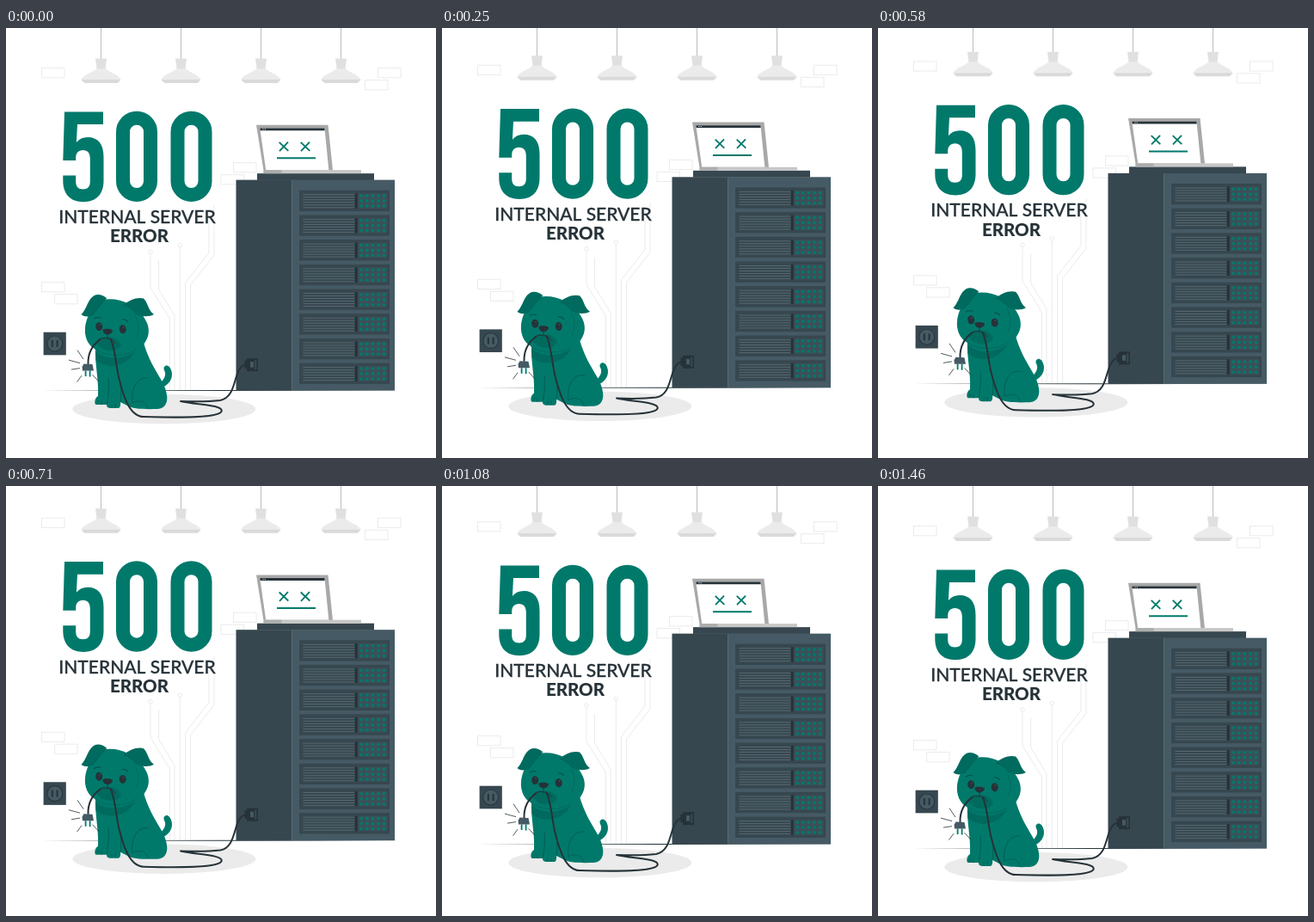
Recreate the animation shown at these times as an HTML page with a canvas. Size 500x500 px, loop 1.5 s.

```html
<!DOCTYPE html>
<html lang="en">
<head>
<meta charset="utf-8">
<title>Internal server error</title>
<style>
  html, body { margin: 0; width: 100%; height: 100%; overflow: hidden; background: #fff; }
  canvas { display: block; width: 500px; height: 500px; }
</style>
</head>
<body>
<canvas id="stage" width="500" height="500"></canvas>
<script>
const ctx = document.getElementById('stage').getContext('2d');
const LOOP = 1500, STEPS = 36, LIFT = 10, REST_Y = 0.4;
const TEAL = '#00796b', SHADE = '#006a5e', LINE = '#00564c';
const INK = '#263238', DARK = '#37474f', SLATE = '#455a64', PALE = '#ebebeb';

function fill(d, color) {
  ctx.fillStyle = color;
  ctx.fill(new Path2D(d));
}

function stroke(d, color, width = 1) {
  ctx.strokeStyle = color;
  ctx.lineWidth = width;
  ctx.lineJoin = 'round';
  ctx.stroke(new Path2D(d));
}

function rect(x, y, w, h, color) {
  ctx.fillStyle = color;
  ctx.fillRect(x, y, w, h);
}

function ellipse(x, y, rx, ry, color, angle = 0) {
  ctx.beginPath();
  ctx.ellipse(x, y, rx, ry, angle, 0, Math.PI * 2);
  ctx.fillStyle = color;
  ctx.fill();
}

function ring(x, y, r) {
  ctx.beginPath();
  ctx.arc(x, y, r, 0, Math.PI * 2);
  ctx.strokeStyle = PALE;
  ctx.lineWidth = 1;
  ctx.stroke();
}

function drawWall() {
  const bricks = [[41.5, 46.5], [432.5, 46.5], [417.5, 60.5], [264.5, 156.5],
                  [250, 170.5], [41.5, 295.5], [56.5, 309.5]];
  ctx.strokeStyle = PALE;
  ctx.lineWidth = 1;
  for (const [x, y] of bricks) ctx.strokeRect(x, y, 26.5, 11.2);

  stroke('M168 262.5V302L190.5 338V421', PALE);
  stroke('M177.5 270V304L196 334V421', PALE);
  stroke('M202.3 255V421', PALE);
  stroke('M236 214V261L208.5 296V421', PALE);
  stroke('M242 206V264L214.5 299V421', PALE);
  ring(168, 260, 2.3);
  ring(202.3, 252.5, 2.3);
}

function drawLamp(x) {
  ctx.save();
  ctx.translate(x, 0);
  stroke('M0 -20V37', '#b5b5b5', 0.9);
  fill('M-5 46H5C6 51 22 54 23 60.5H-23C-22 54 -6 51 -5 46Z', PALE);
  fill('M-6.5 35.5H6.5L5 47H-5Z', '#e0e0e0');
  fill('M-23 60H23L19.5 64H-19.5Z', '#dadada');
  ctx.restore();
}

function drawLabel(text, x, y, font, weight) {
  ctx.font = font;
  ctx.textAlign = 'center';
  ctx.fillStyle = ctx.strokeStyle = INK;
  ctx.lineWidth = weight;
  ctx.fillText(text, x, y);
  ctx.strokeText(text, x, y);
}

function drawTitle() {
  fill(`M68 97.3H113V112H83L81.9 133Q86.5 127 95 127C107 127 113.5 134.5 113.5 150
    V177.5C113.5 193.5 105 202.2 90 202.2C75 202.2 66.3 193.5 66.3 177.5V171.5H81.2V178.5
    C81.2 184.5 84 187.5 89.5 187.5C95 187.5 97.8 184.5 97.8 178.5V152C97.8 145.5 95 142 89.5 142
    C84 142 81.2 145.5 81.2 151V154H66.3Z`, TEAL);
  ctx.strokeStyle = TEAL;
  ctx.lineWidth = 16;
  for (const x of [136, 199.5]) {
    ctx.beginPath();
    ctx.roundRect(x, 104.6, 32, 89.4, 16);
    ctx.stroke();
  }
  drawLabel('INTERNAL SERVER', 152.5, 226.9, '500 21px Lato, sans-serif', 0.35);
  drawLabel('ERROR', 155, 249.2, '800 20.5px Lato, sans-serif', 0.1);
}

function drawUnit(y) {
  rect(341, y, 105, 24.3, DARK);
  for (let i = 0; i < 6; i++) rect(345.5, y + 4.5 + i * 3, 59.5, 1, '#566972');
  rect(406, y + 3.5, 2.6, 17.5, INK);
  rect(409.5, y + 3.5, 34, 17.5, '#3d4f58');
  for (let row = 0; row < 3; row++) {
    for (let col = 0; col < 5; col++) {
      ellipse(413.2 + col * 6.6, y + 6.3 + row * 6, 1.9, 1.9, TEAL);
    }
  }
}

function drawServer() {
  rect(267.5, 176.5, 65, 245, DARK);
  rect(332.5, 176.5, 119.5, 245, SLATE);
  stroke('M332.5 176.5V421.5', '#53666f', 0.8);
  rect(292, 169, 136, 7.8, DARK);
  for (let i = 0; i < 8; i++) drawUnit(188.6 + i * 28.7);
}

function drawLaptop() {
  fill('M291 112.7H374.5L380 165.5H299.5Z', '#a8a8a8');
  fill('M295.3 116.7H370.5L375.3 165H302.2Z', '#fff');
  fill('M295.3 116.4H370.4L370.7 119.2H295.7Z', INK);
  rect(298.5, 117.2, 1, 1, '#fff');
  rect(300.8, 117.2, 1, 1, '#fff');
  rect(299.5, 165, 113.5, 4, '#c7c7c7');
  rect(299.5, 165, 21, 4, '#adadad');
  for (const x of [323, 348]) {
    stroke(`M${x - 5.3} 132.8L${x + 5.3} 142.8M${x + 5} 132.5L${x - 5} 143.1`, TEAL, 1.9);
  }
  stroke('M315 151.2H360', TEAL, 2);
}

function drawOutlet() {
  rect(43.6, 353.6, 26.2, 26.6, DARK);
  ellipse(56.7, 366.9, 9.3, 9.3, INK);
  ellipse(56.7, 366.9, 8.4, 8.4, SLATE);
  rect(52.8, 362.9, 2, 8, INK);
  rect(58.6, 362.9, 2, 8, INK);
}

function drawDog() {
  // tail
  fill('M178 414C184 409 187 403 184 398C182 393 187 390.5 190 394C196 402 193 413 182 418Z', TEAL);
  // body and legs
  fill(`M104 372C103 390 108 408 107 428C103 430 102.5 437 104.5 438H117
    C117 441 119 442 122 442H131C133 441 133.5 438 133 435L141 439C147 443 160 443.5 176 443
    C186 442.5 189 434 186.5 424C184 409 169 397 160 366L150 350Z`, TEAL);
  fill('M104.5 376C114 386 135 387 151 375C139 397 114 396 104.5 386Z', SHADE);
  stroke('M119 407C120 417 119 425 117.5 437', LINE, 0.8);
  stroke('M133 412C134 422 134 429 133 435', LINE, 0.8);
  stroke('M147 436C145 418 153 405 166 407', LINE, 0.8);
  stroke('M147 436C154 432 163 433 165 442M107 433V437M111 434V438M123 437V441M127 437V441', LINE, 0.7);
  // head
  fill(`M112 316C122 314 134 315.5 143 321C154 327 160 334 164 343C167.5 352 166 360 160 368
    C152 378 139 383 121 381C112 380 106 377 103 373C95 369 91 358 92 349
    C93 337 101 320 112 316Z`, TEAL);
  fill('M105 365C109 359 114 358 118 360C123 358 131 361 134 368C132 378 109 378 105 365Z', SHADE);
  stroke('M104 373C113 382 140 383 151 373M150 334C155 342 155 354 151 361', SHADE);
  // ears
  fill('M117 314C110 308 103 309 99 314C94 320 93 328 87.5 333C90 336 96 336 100 334C105 329 110 321 117 314Z', SHADE);
  fill('M137 322C143 316 153 312.5 160 314.5C165 319 165 328 172 333C167 336 158 336 152 333C148 328 144 324 137 322Z', SHADE);
  stroke('M117 314C110 321 105 329 100 334M137 322C144 324 148 328 152 333', LINE, 0.6);
  // face
  ellipse(108.2, 347, 4, 5, INK, -0.1);
  ellipse(135.7, 350.2, 4, 5, INK, -0.1);
  ellipse(109, 345, 0.8, 0.8, SLATE);
  ellipse(136.5, 348, 0.8, 0.8, SLATE);
  stroke('M102 338Q106 335 110 337M135 339Q139 338 142 342', LINE, 1.2);
  fill('M112.5 351C114 349 122 349 124 351.5C124 354 121 356.5 118 356.5C115 356.5 112 353.5 112.5 351Z', INK);
  stroke('M118 356V361M109 362C112 360 116 360 118 361C121 360 125 363 127 367', INK);
}

function drawCord() {
  stroke('M95.5 391C95 378 101 368 110 361.5', INK, 2);
  stroke(`M121 361C126 367 127 386 131 406C136 426 143 451.5 160 452
    C200 453 250 453.5 250.8 445C251 438 222 438 203 433.8
    C217 434.3 234 434.6 249 432.8C271 429 262 392 281 391`, INK, 2);
  // wall side plug
  fill('M90.5 390.5L100.5 391L102 398.5H89L88.5 394Z', SLATE);
  stroke('M92.6 398.5V405M97.6 398.5V405.5', TEAL, 1.8);
  stroke('M83 374.5L90 385M73 386L86 389.5M76 397L86 395.5M82.5 411.5L88 404M100.5 403L108 411', INK, 0.8);
  // server side plug
  rect(280, 384, 13, 15, INK);
  rect(289, 386, 2.5, 11, DARK);
  rect(277.5, 386.5, 10, 9.5, INK);
  rect(284, 388, 4, 6.5, SLATE);
}

function draw(now) {
  // the float advances in discrete steps, each posed at its midpoint
  const step = Math.floor((now % LOOP + 5) / (LOOP / STEPS)) % STEPS;
  const phase = (step + 0.5) / STEPS;
  const lift = LIFT * (1 - Math.abs(1 - 2 * phase));

  rect(0, 0, 500, 500, '#fff');
  ctx.save();
  ctx.translate(0, REST_Y - lift);
  drawWall();
  [110.5, 203.5, 296.5, 389.5].forEach(drawLamp);
  drawTitle();
  ellipse(183.8, 443, 106.5, 17.2, PALE);
  fill('M41 421.5L250 421L460 421.5L250 422Z', INK);
  drawServer();
  drawLaptop();
  drawOutlet();
  drawDog();
  drawCord();
  ctx.restore();
}

const start = performance.now();
function tick() {
  draw(performance.now() - start);
  requestAnimationFrame(tick);
}
tick();
</script>
</body>
</html>
```
